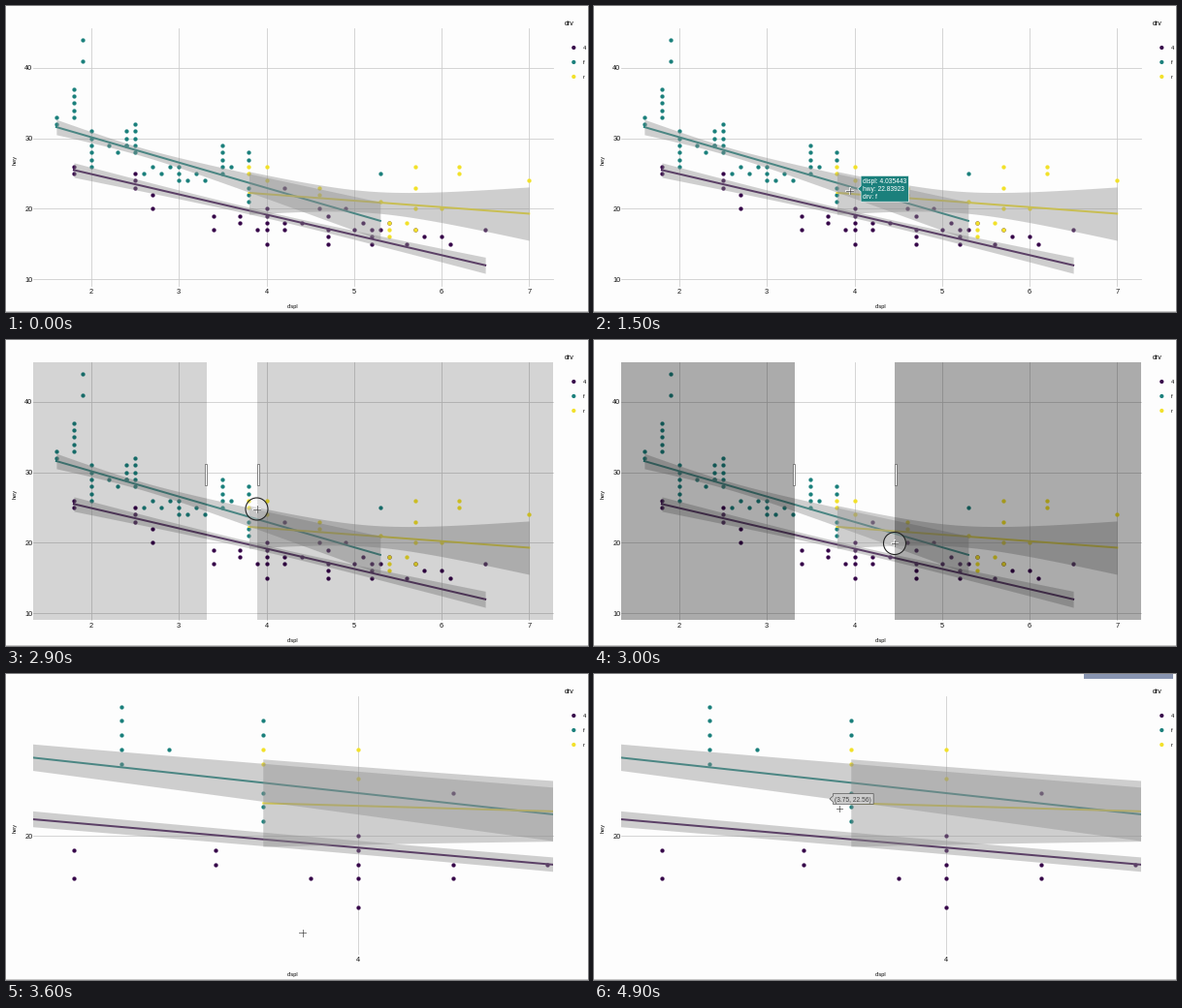
Animation of 600 by 316 pixels, one loop 5000 ms. Source, as a matplotlib script:

```python
import numpy as np
import matplotlib.pyplot as plt
from matplotlib.animation import FuncAnimation
from matplotlib.patches import Circle, Polygon, Rectangle

W, H, DPI = 600, 316, 100
FRAMES, STEP = 50, 100
PT = 72 / DPI
LEFT, TOP, RIGHT, BOTTOM = 28, 23, 564, 289
COLORS = {"4": "#37084a", "f": "#1b807c", "r": "#f2e12a"}

# first and last displ, intercept, slope, band half width, band spread, mean displ
FITS = {
    "4": (1.8, 6.5, 30.683, -2.878, 0.47, 0.42, 4.0),
    "f": (1.6, 5.3, 37.36682, -3.6, 0.57, 0.96, 2.56),
    "r": (3.8, 7.0, 25.78, -0.925, 1.52, 1.91, 5.18),
}
# vertical runs of cars: displ, lowest hwy, highest hwy, step
RUNS = {
    "4": [(1.8, 25, 26), (2.5, 23, 25), (2.7, 20, 22, 2), (3.4, 17, 19, 2),
          (3.7, 18, 19), (3.9, 17), (4, 15), (4, 17, 20), (4.2, 17, 18),
          (4.2, 23), (4.4, 18), (4.7, 15, 17), (5.2, 15, 17), (6.5, 17)],
    "f": [(1.6, 32, 33), (1.8, 33, 37), (1.9, 41, 44, 3), (2, 26, 31),
          (2.4, 29, 31), (2.5, 28, 32), (3, 24, 26), (3.5, 25, 29),
          (3.6, 26), (3.8, 21, 23), (3.8, 27, 28), (5.3, 25)],
    "r": [(3.8, 25, 26), (4, 24, 26, 2), (4.6, 22, 23), (5.4, 16, 18),
          (5.7, 17, 26, 3), (6.2, 25, 26), (7, 24)],
}
# single cars near the fit: count, displ range, residual range
STRAYS = {"4": (12, 4.6, 6.1, 0, 3), "f": (10, 2.2, 3.3, -3, 0),
          "r": (3, 5.3, 6.0, -5, 0)}
# time, x, y of the pointer
PATH = np.array([
    (100, 330, 52), (600, 268, 190), (900, 277, 214), (1200, 267, 194),
    (1500, 263.5, 191), (2400, 215.5, 142.5), (2800, 207, 139),
    (3000, 310, 210), (3500, 306.5, 269), (4200, 300, 258), (4900, 253, 139)])
DRAG_START = (207, 139)

plt.rcParams["font.family"] = "Liberation Sans"
fig = plt.figure(figsize=(W / DPI, H / DPI), dpi=DPI, facecolor="#fdfdfd")
ax = fig.add_axes([0, 0, 1, 1])


def to_px(displ, hwy, zoomed):
    displ, hwy = np.asarray(displ), np.asarray(hwy)
    if zoomed:
        return 363 + (displ - 4) * 488.6, 167 - (hwy - 20) * 14.83
    return 88 + (displ - 2) * 90.25, 64 + (40 - hwy) * 7.27


def fit(drv):
    first, last, intercept, slope, half, spread, mean = FITS[drv]
    x = np.linspace(first, last, 80)
    return x, intercept + slope * x, np.hypot(half, spread * (x - mean))


def make_cars(drv):
    cars = []
    for displ, low, *rest in RUNS[drv]:
        high, step = (rest + [1])[:2] if rest else (low, 1)
        cars += [(displ, hwy) for hwy in range(low, high + 1, step)]
    rng = np.random.default_rng(4)
    count, first, last, below, above = STRAYS[drv]
    displ = np.linspace(first, last, count).round(1)
    x, y, _ = fit(drv)
    hwy = np.round(np.interp(displ, x, y) + rng.uniform(below, above, count))
    return np.array(cars + list(zip(displ, hwy))).T


CARS = {drv: make_cars(drv) for drv in COLORS}


def text(x, y, label, size, color="#111111", ha="center", **kw):
    return ax.text(x, y, label, size=size * PT, color=color, ha=ha,
                   va="center_baseline", **kw)


def rect(x0, y0, x1, y1, color, z, **kw):
    ax.add_patch(Rectangle((x0, y0), x1 - x0, y1 - y0, fc=color, zorder=z, **kw))


def draw_axes(zoomed):
    for displ in ([4] if zoomed else range(2, 8)):
        x = float(to_px(displ, 0, zoomed)[0])
        ax.plot([x, x], [TOP, BOTTOM], color="#cccccc", lw=0.8 * PT, zorder=1)
        text(x, 294.3, str(displ), 7.4)
    for hwy in ([20] if zoomed else range(10, 41, 10)):
        y = float(to_px(0, hwy, zoomed)[1])
        ax.plot([LEFT, RIGHT], [y, y], color="#cccccc", lw=0.8 * PT, zorder=1)
        text(27.5, y, str(hwy), 7.4, ha="right")
    text(296, 310, "displ", 5.6, "black")
    text(9, 156, "hwy", 5.6, "black", rotation=90)
    text(575.5, 18, "drv", 7.1, "black", ha="left")
    for row, (drv, color) in enumerate(COLORS.items()):
        y = 43 + 15 * row
        ax.add_patch(Circle((585.3, y), 2.1, fc=color, lw=0))
        text(595, y, drv, 5.6, "black", ha="left")
    ax.plot([0, W], [315.3, 315.3], color="#c8c8c8", lw=PT)


def draw_data(zoomed):
    panel = Rectangle((LEFT, TOP), RIGHT - LEFT, BOTTOM - TOP,
                      transform=ax.transData)
    for order, (drv, color) in enumerate(COLORS.items()):
        dots = ax.scatter(*to_px(*CARS[drv], zoomed), s=(4.3 * PT) ** 2,
                          c=color, lw=0, zorder=2 + order / 10)
        x, y, half = fit(drv)
        line, = ax.plot(*to_px(x, y, zoomed), color=color, lw=2 * PT,
                        zorder=3 + order / 10)
        px, low = to_px(x, y - half, zoomed)
        high = to_px(x, y + half, zoomed)[1]
        band = ax.fill_between(px, low, high, color="#8f8f8f", alpha=0.42,
                               lw=0, zorder=4 + order / 10)
        for artist in (dots, line, band):
            artist.set_clip_path(panel)


def tooltip(x, y, lines, fill, ink):
    spacing = 8
    x0 = x + 3.4
    labels = [text(x0 + 2, y + spacing * (row - (len(lines) - 1) / 2), label,
                   6.6, ink, ha="left", zorder=7)
              for row, label in enumerate(lines)]
    x1 = x0 + 4 + max(label.get_window_extent().width for label in labels)
    half = spacing * len(lines) / 2 + 1.4
    ax.add_patch(Polygon(
        [(x, y), (x0, y - 3), (x0, y - half), (x1, y - half),
         (x1, y + half), (x0, y + half), (x0, y + 3)],
        fc=fill, ec=ink, lw=0.6 * PT, zorder=6))


def data_tooltip(displ, hwy, drv):
    x, y = to_px(displ, hwy, False)
    tooltip(float(x), float(y),
            [f"displ: {displ:.7g}", f"hwy: {hwy:.7g}", f"drv: {drv}"],
            COLORS[drv], "white")


def line_tooltip(drv, cursor_x):
    x, y, _ = fit(drv)
    nearest = np.argmin(abs(to_px(x, y, False)[0] - cursor_x - 8))
    data_tooltip(x[nearest], y[nearest], drv)


def draw_tooltip(t, x, y):
    if 400 <= t < 700 or 1100 <= t < 1900:
        line_tooltip("f", x)
    elif 700 <= t < 1100:
        line_tooltip("4", x)
    elif 2200 <= t < 2500:
        data_tooltip(3.6, 26, "f")
    elif t >= 4600:
        px, py = x - 10, y - 10
        displ, hwy = 4 + (px - 363) / 488.6, 20 + (167 - py) / 14.83
        tooltip(px, py, [f"({displ:.2f}, {hwy:.2f})"], "#cccccc", "#444444")


def draw_selection(t, x, y):
    x0, y0 = DRAG_START
    across = t <= 3000
    shade = dict(alpha=np.interp(t, [2800, 3000, 3100], [0, 0.32, 0.44]),
                 lw=0, antialiased=False)
    top, bottom = (TOP, BOTTOM) if across else (y0, y)
    rect(LEFT, TOP, x0, BOTTOM, "black", 5, **shade)
    rect(x, TOP, RIGHT, BOTTOM, "black", 5, **shade)
    rect(x0, TOP, x, top, "black", 5, **shade)
    rect(x0, bottom, x, BOTTOM, "black", 5, **shade)
    handle = dict(ec="#444444", lw=0.6 * PT)
    if across:
        for edge in (x0 - 1, x + 1):
            rect(edge - 1, y0 - 11, edge + 1, y0 + 11, "white", 6, **handle)
        return
    bracket = [(-1.5, -1.5), (4, -1.5), (4, 0), (0, 0), (0, 4), (-1.5, 4)]
    for cx, sx in ((x0, 1), (x, -1)):
        for cy, sy in ((y0, 1), (y, -1)):
            ax.add_patch(Polygon([(cx + sx * a, cy + sy * b) for a, b in bracket],
                                 fc="white", zorder=6, **handle))


def draw_cursor(x, y, pressed):
    if pressed:
        ax.add_patch(Circle((x, y), 11.5, fc=(1, 1, 1, 0.25), ec="#222222",
                            lw=1.1 * PT, zorder=8))
    for color, width in (("white", 2), ("#333333", 0.9)):
        for dx, dy in ((3.2, 0), (0, 3.2)):
            ax.plot([x - dx, x + dx], [y - dy, y + dy], color=color,
                    lw=width * PT, alpha=0.7, zorder=9)


def draw(frame):
    t = frame * STEP
    zoomed = t >= 3600
    ax.clear()
    ax.set(xlim=(0, W), ylim=(H, 0))
    ax.axis("off")
    draw_axes(zoomed)
    draw_data(zoomed)
    if t >= 3700:
        rect(505, 0, 597, 5, "#8894b0", 5, lw=0)
    if t >= 100:
        x, y = (np.interp(t, PATH[:, 0], PATH[:, i]) for i in (1, 2))
        if 2800 < t < 3600:
            draw_selection(t, x, y)
        draw_tooltip(t, x, y)
        draw_cursor(x, y, 2800 <= t < 3500)


anim = FuncAnimation(fig, draw, frames=FRAMES, interval=STEP,
                     repeat=True, repeat_delay=0)
plt.show()
```
